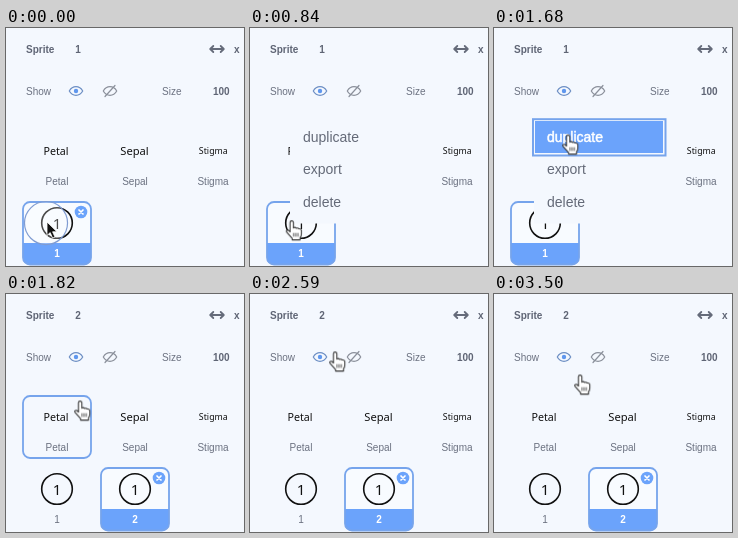
An HTML page that plays this animation: 238x238 px, repeating every 3570 ms.

```html
<!DOCTYPE html>
<html lang="en">
<head>
<meta charset="utf-8">
<title>Duplicate a sprite</title>
<style>
html, body { margin: 0; width: 100%; height: 100%; overflow: hidden; background: #f4f8fe; }
svg { display: block; width: 100vw; height: 100vh; }
text { font-family: "Liberation Sans", Arial, sans-serif; font-size: 10px; fill: #6b7180; }
.bold { font-weight: 700; fill: #5f6575; }
.mid { text-anchor: middle; }
.art { font-family: "Noto Sans", "Open Sans", sans-serif; font-weight: 500; fill: #111; text-anchor: middle; }
.menu text { font-size: 14px; fill: #646a78; }
text.white { fill: #fff; }
.line { fill: none; stroke: #76a4ec; stroke-width: 1.8; }

/* every track shares the same loop */
.first, .second, .menu, .hand, .arrow, .spot, .ring, .row, .rowtext, .pulse, .hover, .field {
  animation: 3570ms step-end infinite;
}
.first { animation-name: first; }
.second { animation-name: second; }
.menu { animation-name: menu; }
.arrow { animation-name: arrow; }
.spot { animation-name: spot; }
.hand { animation-name: move; animation-timing-function: linear; }
.ring { animation-name: ring; animation-timing-function: linear; transform-origin: 40px 195px; }
.pulse { animation-name: pulse; animation-timing-function: linear; }
.hover { animation-name: hover; }
.field { animation-name: field; animation-timing-function: linear; }
.r1 { animation-name: duplicate; animation-timing-function: linear; }
.r2 { animation-name: export; }
.r3 { animation-name: delete; }
.t1 { animation-name: t1; }
.t2 { animation-name: t2; }
.t3 { animation-name: t3; }

@keyframes first { 0% { opacity: 1 } 49.02%, 100% { opacity: 0 } }
@keyframes second { 0% { opacity: 0 } 49.02%, 100% { opacity: 1 } }
@keyframes menu { 0% { opacity: 0 } 11.76% { opacity: 1 } 49.02%, 100% { opacity: 0 } }
@keyframes arrow { 0% { opacity: 1 } 19.61%, 100% { opacity: 0 } }
@keyframes spot { 0% { opacity: 0 } 19.61%, 100% { opacity: 1 } }
@keyframes move {
  0%, 23.53% { transform: translate(41.5px, 193px) }
  25.49% { transform: translate(48px, 172px) }
  27.45% { transform: translate(58px, 145px) }
  29.41% { transform: translate(67px, 120px) }
  31.37% { transform: translate(72px, 108px) }
  33.33%, 41.18% { transform: translate(73px, 107px) }
  43.14%, 60.78% { transform: translate(74px, 107px) }
  66.67% { transform: translate(78px, 95px) }
  72.55% { transform: translate(85px, 58px) }
  76.47% { transform: translate(85px, 45px) }
  80.39% { transform: translate(82px, 28px) }
  84.31%, 88.24% { transform: translate(80px, 20px) }
  92.16% { transform: translate(82px, 29px) }
  94.12% { transform: translate(84px, 44px) }
  98.04%, 100% { transform: translate(86px, 81px) }
}
@keyframes ring {
  0% { opacity: 1; transform: scale(1) }
  5.88% { opacity: 0; transform: scale(1.15) }
  9.8% { opacity: 0; transform: scale(.5) }
  11.76% { opacity: 1; transform: scale(.8) }
  19.61%, 100% { opacity: 0; transform: scale(1.4) }
}
@keyframes duplicate {
  0%, 29.4% { opacity: 0 }
  31.37% { opacity: .8 }
  33.33%, 100% { opacity: 1 }
}
@keyframes export { 0% { opacity: 0 } 27.45% { opacity: .8 } 29.41%, 100% { opacity: 0 } }
@keyframes delete { 0% { opacity: 0 } 25.49% { opacity: .8 } 27.45%, 100% { opacity: 0 } }
@keyframes t1 { 0% { fill: #646a78; stroke: none } 30.5%, 100% { fill: #fff; stroke: #fff } }
@keyframes t2 { 0% { fill: #646a78 } 27.45% { fill: #fff } 29.41%, 100% { fill: #646a78 } }
@keyframes t3 { 0% { fill: #646a78 } 25.49% { fill: #fff } 27.45%, 100% { fill: #646a78 } }
@keyframes pulse { 0%, 41.18% { opacity: 0 } 45.1%, 100% { opacity: 1 } }
@keyframes hover { 0% { opacity: 0 } 49.02% { opacity: 1 } 64.71%, 100% { opacity: 0 } }
@keyframes field {
  0%, 77.5% { opacity: 0 }
  80.39%, 92.16% { opacity: 1 }
  94.12%, 100% { opacity: 0 }
}
</style>
</head>
<body>
<svg viewBox="0 0 238 238">
  <defs>
    <g id="badge">
      <circle cx="51" cy="195" r="15.3" fill="none" stroke="#111" stroke-width="1.6"/>
      <text class="art" x="51" y="200.5" style="font-size:15px">1</text>
    </g>
    <g id="tile">
      <rect x="17" y="174" width="68" height="62.5" rx="7" fill="#f8fbff"/>
      <path d="M17 215H85V229.5q0 7-7 7H24q-7 0-7-7z" fill="#6ba3fb"/>
      <rect class="line" x="17" y="174" width="68" height="62.5" rx="7"/>
      <circle cx="75" cy="184" r="6.3" fill="#6ba3fb"/>
      <path d="M73 182l4 4m0-4l-4 4" stroke="#fff" stroke-width="1.7" stroke-linecap="round"/>
    </g>
    <path id="lid" d="M-6.7 0C-3.5-5.8 3.5-5.8 6.7 0C3.5 5.8-3.5 5.8-6.7 0z" fill="none" stroke-width="1.2"/>
  </defs>

  <rect width="238" height="238" fill="#f4f8fe"/>

  <!-- properties -->
  <rect class="field line" x="57" y="6" width="126" height="31" rx="15.5" style="stroke-width:1.3"/>
  <text class="bold" x="20" y="25">Sprite</text>
  <text class="bold mid first" x="72" y="25">1</text>
  <text class="bold mid second" x="72" y="25">2</text>
  <path d="M205 21H217M207.3 18L204.2 21L207.3 24M214.7 18L217.8 21L214.7 24" fill="none" stroke="#656b7a" stroke-width="1.8" stroke-linecap="round" stroke-linejoin="round"/>
  <text class="bold" x="228" y="25">x</text>
  <text x="20" y="67">Show</text>
  <g transform="translate(70 63)">
    <use href="#lid" stroke="#6d8fc4"/>
    <circle r="2.2" fill="#5f97ee"/>
  </g>
  <g transform="translate(104 63)" fill="none" stroke="#8b909b">
    <use href="#lid"/>
    <path d="M-5 5.5L5-5.5" stroke-width="1.2" stroke-linecap="round"/>
  </g>
  <text x="156" y="67">Size</text>
  <text class="bold" x="207" y="67">100</text>

  <!-- sprite list -->
  <rect class="hover line" x="17" y="102" width="68" height="62" rx="7"/>
  <text class="art" x="50" y="127" style="font-size:10.7px">Petal</text>
  <text class="art" x="128.5" y="127" style="font-size:11.2px">Sepal</text>
  <text class="art" x="207.3" y="126" style="font-size:8.8px">Stigma</text>
  <text class="mid" x="51" y="157">Petal</text>
  <text class="mid" x="129" y="157">Sepal</text>
  <text class="mid" x="207" y="157">Stigma</text>

  <g class="first">
    <use href="#tile"/>
    <text class="bold mid white" x="51" y="229">1</text>
  </g>
  <use href="#badge"/>
  <g class="second">
    <text class="mid" x="51" y="229">1</text>
    <g transform="translate(78 0)">
      <use href="#tile"/>
      <use href="#badge"/>
      <text class="bold mid white" x="51" y="229">2</text>
    </g>
  </g>

  <!-- context menu -->
  <g class="menu">
    <rect x="40" y="92" width="130" height="103.5" fill="#f4f8fe"/>
    <g fill="#6ba3fb">
      <rect class="row r1" x="41" y="93" width="128" height="32"/>
      <rect class="row r2" x="41" y="125" width="128" height="33"/>
      <rect class="row r3" x="41" y="158" width="128" height="32"/>
    </g>
    <rect class="pulse line" x="39" y="91.2" width="132.5" height="36.3" style="stroke-width:2"/>
    <text class="rowtext t1" x="53" y="114" stroke-width=".5">duplicate</text>
    <text class="rowtext t2" x="53" y="146">export</text>
    <text class="rowtext t3" x="53" y="179">delete</text>
  </g>

  <!-- pointer -->
  <circle class="ring" cx="40" cy="195" r="21.5" fill="#fff" fill-opacity=".25" stroke="#7f9cd2" stroke-width="1.2"/>
  <path class="arrow" d="M41 194V207.5L44.2 204.6L46.6 210L49 209L46.6 203.8H51z" fill="#111" stroke="#fff" stroke-width=".8"/>
  <g class="spot">
    <g class="hand">
      <g transform="translate(-5.8 -.5) scale(1.06)" stroke="#333" stroke-width="1" stroke-linejoin="round">
        <path d="M4 11V2.2a1.6 1.6 0 0 1 3.2 0V7.2q1.5-1 2.6.3 1.6-.7 2.5.6 2.2-.3 2.4 1.6V13q0 2-1.2 3.4V18.5H6V17L1 11.5q-1.2-2 .8-2.3 1.2 0 2.2 1.8z" fill="#fff"/>
        <path d="M7.4 12v3.5M9.4 12v3.5M11.4 12v3.5" stroke-width=".8"/>
      </g>
    </g>
  </g>
</svg>
</body>
</html>
```
